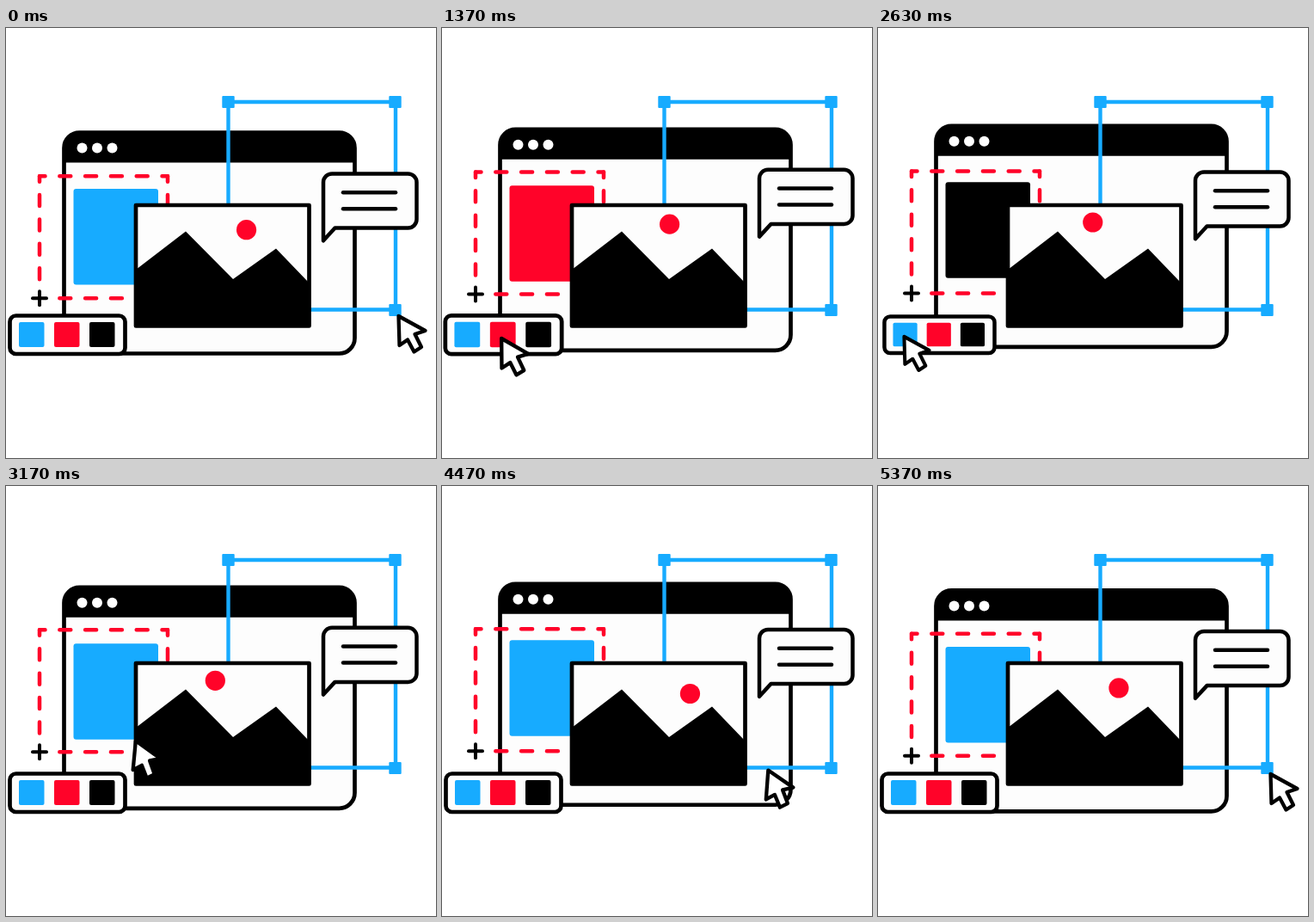
Animation of 500x500 px, one loop 5410 ms. Source, as an HTML page with a canvas:

```html
<!DOCTYPE html>
<html lang="en">
<head>
<meta charset="utf-8">
<title>Design tools</title>
<style>
html, body { margin: 0; width: 100%; height: 100%; overflow: hidden; background: #fff; }
canvas { display: block; width: 500px; height: 500px; }
</style>
</head>
<body>
<canvas id="stage" width="500" height="500"></canvas>
<script>
const g = document.getElementById('stage').getContext('2d');
const LOOP = 5410, BLUE = '#17abff', RED = '#ff0329', BLACK = '#000', PAPER = '#fdfdfd';
const CLICKS = [[1095, RED], [1865, BLACK], [2640, BLUE]];
const GRAB = 3550, DROP = 4080;

const smooth = p => p * p * (3 - 2 * p);
const part = (t, a, b) => Math.min(1, Math.max(0, (t - a) / (b - a)));
const bob = (t, amp, delay) => amp * Math.cos(2 * Math.PI * 3 * (t - delay) / LOOP);

// The sun drifts along a circle until the cursor carries it back.
function drift(t) {
  const a = (31.8 - 0.0118 * (t >= DROP ? t - LOOP : t)) * Math.PI / 180;
  return [249 + 58 * Math.sin(a), 284 - 58 * Math.cos(a)];
}

const HOME = [455, 333];
// start, end, destination, sag, sag skew, wind-up
const LEGS = [
  [60, 780, [62, 355], 28, 0, 0.13],
  [1250, 1800, [108, 356], 6, 0, 0],
  [1980, 2520, [29, 357], 7, 0, 0],
  [2830, 3450, drift(GRAB), 12, 0, 0],
  [GRAB, DROP, drift(DROP), 4, 0, 0],
  [4170, 4750, HOME, 77, 1, 0]
];

function tip(t) {
  let from = HOME;
  for (const [a, b, to, sag, skew, windUp] of LEGS) {
    if (t < a) return from;
    if (t < b) {
      const p = part(t, a, b);
      const e = smooth(p) - windUp * Math.sin(2 * Math.PI * p) * (1 - p);
      return [
        from[0] + (to[0] - from[0]) * e,
        from[1] + (to[1] - from[1]) * e + sag * Math.sin(Math.PI * p) * (1 - p) ** skew
      ];
    }
    from = to;
  }
  return from;
}

// 1 when fully pressed, slightly negative on the rebound.
function press(t) {
  let sum = 0;
  for (const [c] of CLICKS) {
    sum += smooth(part(t, c - 120, c)) - 1.35 * smooth(part(t, c, c + 160))
      + 0.35 * smooth(part(t, c + 160, c + 450));
  }
  return sum;
}

function paint(fill, stroke, width = 4.7) {
  if (fill) { g.fillStyle = fill; g.fill(); }
  if (stroke) { g.strokeStyle = stroke; g.lineWidth = width; g.stroke(); }
}
function box(x, y, w, h, r, ...style) {
  g.beginPath();
  g.roundRect(x, y, w, h, r);
  paint(...style);
}
function disc(x, y, r, fill) {
  g.beginPath();
  g.arc(x, y, r, 0, 7);
  paint(fill);
}
function poly(points, closed, ...style) {
  g.beginPath();
  points.forEach(p => g.lineTo(...p));
  if (closed) g.closePath();
  paint(...style);
}
function group(dx, dy, draw) {
  g.save();
  g.translate(dx, dy);
  draw();
  g.restore();
}

function browser(color) {
  box(67.5, 121.5, 338, 257, 18, PAPER);
  box(67.5, 121.5, 338, 35, [18, 18, 0, 0], BLACK);
  box(67.5, 121.5, 338, 257, 18, null, BLACK);
  for (const x of [88.5, 106, 123.5]) disc(x, 139.5, 6, '#fff');
  box(78.5, 187, 98.5, 111.5, 3, color);
}

function frame() {
  g.beginPath();
  g.rect(258.5, 86, 194.5, 241.5);
  paint(null, BLUE, 4.4);
  for (const [x, y] of [[258.5, 86], [452.5, 86], [452.5, 328]]) box(x - 7.2, y - 7, 14.4, 14, 1, BLUE);
}

function selection() {
  const dash = 13;
  const side = (a, b, period, skip = 0) => {
    g.setLineDash([dash, period - dash]);
    g.lineDashOffset = dash / 2 + skip;
    poly([a, b], false, null, RED, 4.5);
  };
  const px = 149 / 5, py = 142 / 5;
  side([39, 0], [188, 0], px);
  side([39, 0], [39, 127], py);
  side([188, 0], [188, 45], py);
  side([39 + px / 2, 142], [160, 142], px, px / 2);
  g.setLineDash([]);
  poly([[31, 142], [47, 142]], false, null, BLACK, 4);
  poly([[39, 134], [39, 150]], false, null, BLACK, 4);
}

function picture(sun) {
  box(151, 206, 201.5, 140.5, 0, PAPER);
  disc(...sun, 11.6, RED);
  poly([[151, 281], [209, 236.5], [264, 292], [314, 256.5], [352, 296], [352, 346], [151, 346]], true, BLACK);
  box(151, 206, 201.5, 140.5, 0, null, BLACK);
}

function bubble() {
  g.beginPath();
  g.moveTo(369, 247.5);
  g.lineTo(369, 180);
  g.arcTo(369, 169.7, 379, 169.7, 10);
  g.arcTo(477.5, 169.7, 477.5, 180, 10);
  g.arcTo(477.5, 232.8, 467, 232.8, 10);
  g.lineTo(382.5, 232.8);
  g.closePath();
  paint(PAPER, BLACK, 4.5);
  for (const y of [191.5, 210.5]) poly([[392, y], [453, y]], false, null, BLACK, 4.5);
}

function palette(scale) {
  group(71, 356.5, () => {
    g.scale(scale, scale);
    box(-66.5, -22, 134, 44.5, 7, PAPER, BLACK);
    [BLUE, RED, BLACK].forEach((c, i) => box(-56 + 41 * i, -14.5, 29.5, 29, 2, c));
  });
}

function cursor(t) {
  const [x, y] = tip(t);
  const tilt = Math.max(-8, Math.min(8, (x - tip(Math.max(0, t - 10))[0]) * 1.4));
  const held = smooth(part(t, GRAB - 80, GRAB)) - smooth(part(t, DROP, DROP + 90));
  const scale = 1 - 0.06 * press(t) - 0.03 * held;
  group(x, y, () => {
    g.rotate(tilt * Math.PI / 180);
    g.scale(scale, scale);
    poly([[1.5, 2], [32.5, 19], [20.5, 23], [28, 38], [19.5, 43.5], [12, 29.5], [2.5, 36]], true, '#fff', BLACK, 4.3);
  });
}

function draw(now) {
  const t = now % LOOP;
  const color = CLICKS.reduce((c, [at, next]) => t >= at ? next : c, BLUE);
  g.fillStyle = '#fff';
  g.fillRect(0, 0, 500, 500);
  g.lineCap = g.lineJoin = 'round';
  group(0, bob(t, 3.9, 0) - 3.9, () => browser(color));
  frame();
  group(0, 169 + bob(t, 3.6, 150), selection);
  picture(t >= GRAB && t < DROP ? tip(t) : drift(t));
  group(0, bob(t, 3.6, 330) - 1.7, bubble);
  palette(1 - 0.045 * press(t));
  cursor(t);
}

const start = performance.now();
function tick() {
  draw(performance.now() - start);
  requestAnimationFrame(tick);
}
tick();
</script>
</body>
</html>
```
